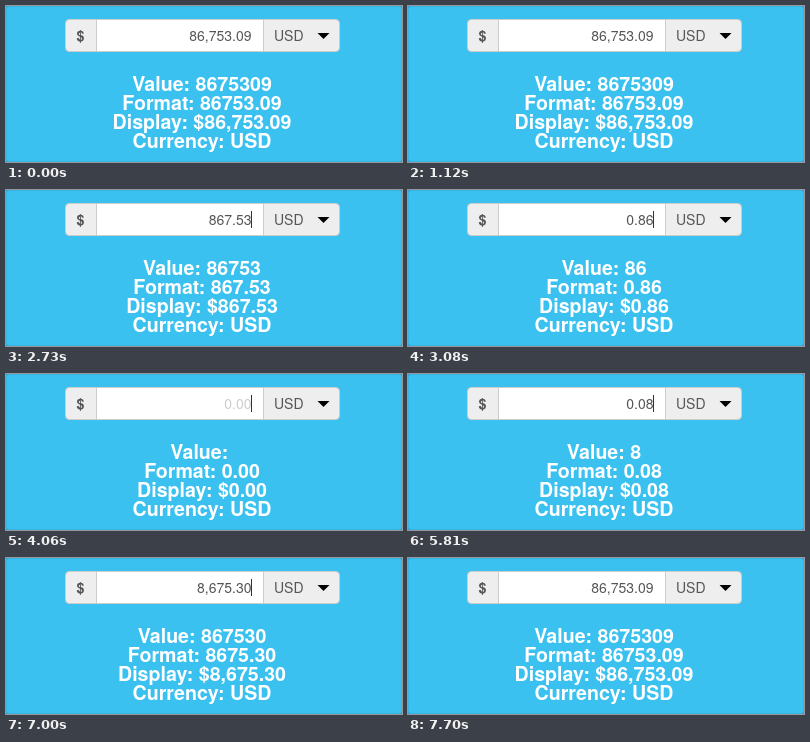
Recreate the animation shown at these times as an HTML page. Size 396 by 156 pixels, loop 8 s.

```html
<!DOCTYPE html>
<html lang="en">
<head>
<meta charset="utf-8">
<title>Currency input</title>
<style>
  html, body { margin: 0; width: 100%; height: 100%; overflow: hidden; background: #3bc1f0; }
  svg { display: block; width: 396px; height: 156px; }
  text { font-family: "Helvetica Neue", Helvetica, "Liberation Sans", Arial, sans-serif; white-space: pre; }
  .field { font-size: 14px; fill: #555; }
  .end { text-anchor: end; }
  .empty { fill: #ccc; }
  .bold { font-weight: bold; }
  .info { font-size: 19.6px; font-weight: bold; fill: #fff; text-anchor: middle; }
</style>
</head>
<body>
<svg viewBox="0 0 396 156">
  <rect width="396" height="156" fill="#35a6d0"/>
  <rect x=".5" y=".5" width="395" height="155" rx="3" fill="#3bc1f0"/>

  <rect x="59.5" y="13.5" width="274" height="32" rx="4" fill="#eee" stroke="#ccc"/>
  <rect x="90.5" y="13.5" width="167" height="32" fill="#fff" stroke="#ccc"/>
  <text class="field bold" x="70.5" y="34.5">$</text>
  <text class="field end" id="amount" x="245.5" y="35"></text>
  <rect id="caret" x="245" y="21" width="1" height="17" fill="#333"/>
  <text class="field" x="268" y="34.5">USD</text>
  <path d="M311.5 27h12l-6 6z"/>

  <text class="info" id="value" x="196" y="84.7"></text>
  <text class="info" id="format" x="196" y="103.9"></text>
  <text class="info" id="display" x="196" y="123.1"></text>
  <text class="info" x="196" y="142.3">Currency: USD</text>
</svg>
<script>
  const LOOP = 8000, BLINK = 560, FOCUS = 1330;
  const DIGITS = '8675309';
  const deletes = [2380, 2590, 2800, 2900, 3010, 3500, 3990];
  const inserts = [5600, 5880, 6020, 6300, 6790, 6960, 7140];
  const keys = [...deletes, ...inserts];

  const $ = id => document.getElementById(id);
  const countBefore = (times, t) => times.filter(k => k <= t).length;

  function caretOn(t) {
    if (t < FOCUS) return false;
    const last = Math.max(FOCUS, ...keys.filter(k => k <= t));
    return Math.floor((t - last) / BLINK) % 2 === 0;
  }

  function draw(t) {
    const length = DIGITS.length - countBefore(deletes, t) + countBefore(inserts, t);
    const value = DIGITS.slice(0, length);
    const plain = (Number(value) / 100).toFixed(2);
    const grouped = plain.replace(/\B(?=(\d{3})+\.)/g, ',');

    $('amount').textContent = grouped;
    $('amount').classList.toggle('empty', !value);
    $('value').textContent = 'Value: ' + value;
    $('format').textContent = 'Format: ' + plain;
    $('display').textContent = 'Display: $' + grouped;
    $('caret').style.opacity = caretOn(t) ? 1 : 0;
  }

  const start = performance.now();
  function tick() {
    draw((performance.now() - start) % LOOP);
    requestAnimationFrame(tick);
  }
  tick();
</script>
</body>
</html>
```
